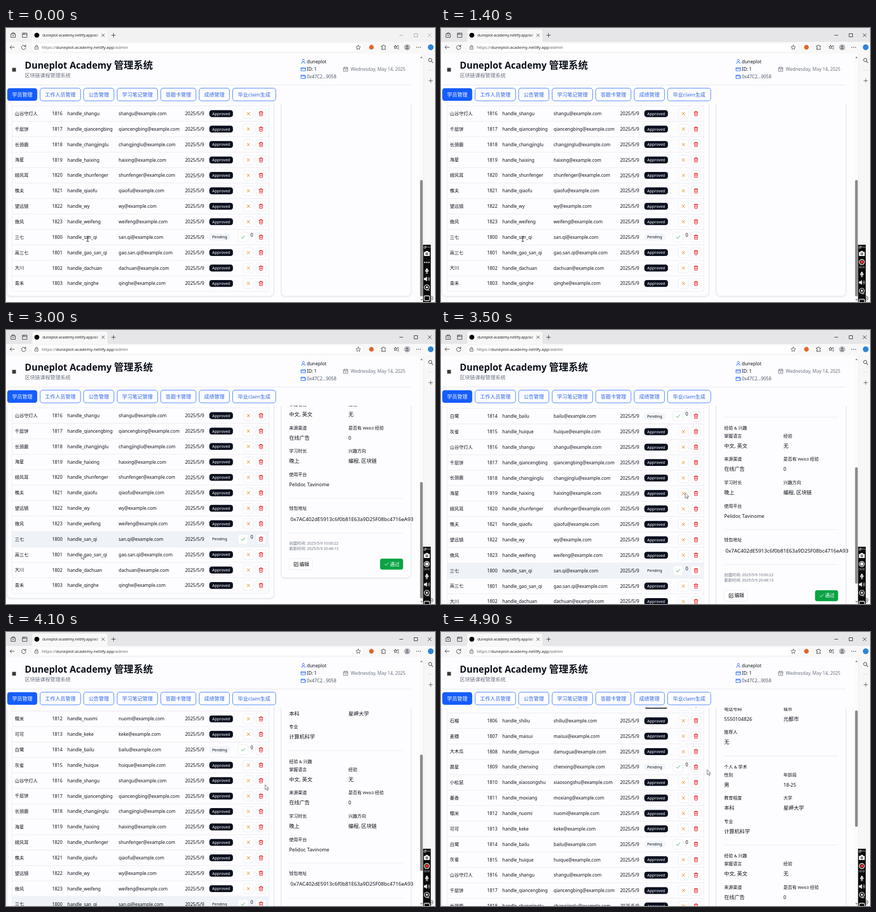
Write an HTML page that moves like this. It is 800x512 px and loops after 5100 ms.

```html
<!DOCTYPE html>
<html lang="zh-CN">
<head>
<meta charset="utf-8">
<title>管理系统</title>
<style>
html, body { margin: 0; width: 100%; height: 100%; overflow: hidden; background: #fdfdff; }
@property --scroll { syntax: "<length>"; inherits: true; initial-value: 0px; }
svg {
  display: block; width: 800px; height: 512px;
  font-family: "Noto Sans", "Noto Sans CJK SC", sans-serif;
  animation: scroll 5100ms step-end infinite;
}
text { fill: #0c1019; }
.icon { fill: none; stroke-width: .9; stroke-linecap: round; stroke-linejoin: round; }
.muted { fill: #6b7280; }
.mid { text-anchor: middle; }
#page { transform: translateY(var(--scroll)); }
#thumb { transform: translateY(calc(var(--scroll) * -.467)); }
#strip, #caption, #empty, #filled, #select, #ibeam, #arrow, #dots, #rec, #clock, #lower, #dot {
  animation: 5100ms step-end infinite;
}
#strip { animation-name: strip; }
#caption { animation-name: focus; }
#empty, #ibeam { animation-name: leave; }
#filled, #select { animation-name: enter; }
#arrow { animation-name: move; }
#dots { animation-name: idle; }
#rec { animation-name: record; }
#clock { animation-name: tick; }
#lower { animation-name: shift; }
#dot { animation-name: blink; }

@keyframes scroll {
  0% { --scroll: 0px; }
  68.62% { --scroll: 58.85px; }
  72.54% { --scroll: 117.7px; }
  84.31% { --scroll: 176.6px; }
  92.15% { --scroll: 235.4px; }
  96.07%, 100% { --scroll: 294.3px; }
}
@keyframes strip { 0% { fill: #f2f2f3; } 7.84%, 100% { fill: #e6e6e8; } }
@keyframes focus { 0% { stroke: #a2a2a2; } 7.84%, 100% { stroke: #222; } }
@keyframes leave { 0% { visibility: visible; } 39.21%, 100% { visibility: hidden; } }
@keyframes enter { 0% { visibility: hidden; } 39.21%, 100% { visibility: visible; } }
@keyframes move {
  0% { visibility: hidden; transform: translate(150px, 392px); }
  39.21% { visibility: visible; transform: translate(148px, 393px); }
  43.13% { transform: translate(136px, 400px); }
  45.09% { transform: translate(130px, 404px); }
  50.98% { transform: translate(132px, 407px); }
  54.9% { transform: translate(137px, 414px); }
  58.82% { transform: translate(140px, 418px); }
  62.74% { transform: translate(190px, 404px); }
  64.7% { transform: translate(330px, 350px); }
  68.62% { transform: translate(455px, 304px); }
  72.54% { transform: translate(479px, 294px); }
  76.47% { transform: translate(481px, 290px); }
  80.39% { transform: translate(483px, 285px); }
  84.31% { transform: translate(484px, 281px); }
  88.23% { transform: translate(488px, 273px); }
  92.15% { transform: translate(492px, 265px); }
  96.07%, 100% { visibility: visible; transform: translate(496px, 257px); }
}
@keyframes idle { 0% { visibility: visible; } 9.8%, 100% { visibility: hidden; } }
@keyframes record { 0% { visibility: hidden; } 9.8%, 100% { visibility: visible; } }
@keyframes tick { 0% { visibility: hidden; } 17.64%, 100% { visibility: visible; } }
@keyframes shift { 0% { transform: none; } 17.64%, 100% { transform: translateY(6.5px); } }
@keyframes blink {
  0%, 15.68%, 33.33%, 50.98%, 68.62%, 86.27% { fill: #fff; }
  9.8%, 24.5%, 42.15%, 59.8%, 77.45%, 95.09%, 100% { fill: #ef2b2d; }
}
</style>
</head>
<body>
<svg id="stage" viewBox="0 0 800 512"></svg>
<script>
// Latin runs are set a little smaller than the CJK runs beside them.
const mix = (str, size) =>
  str.replace(/[\x20-\x7e]+/g, run => `<tspan font-size="${(size * .945).toFixed(2)}">${run}</tspan>`);
// Text placed by its visual middle line.
const text = (x, y, size, str, attr = '') =>
  `<text x="${x}" y="${(y + size * .345).toFixed(2)}" font-size="${size}" ${attr}>${mix(str, size)}</text>`;
const rect = (x, y, w, h, r, fill, stroke = 'none', attr = '') =>
  `<rect x="${x}" y="${y}" width="${w}" height="${h}" rx="${r}" fill="${fill}" stroke="${stroke}" ${attr}/>`;
const circle = (x, y, r, fill, attr = '') => `<circle cx="${x}" cy="${y}" r="${r}" fill="${fill}" ${attr}/>`;
const icon = (x, y, d, color, attr = '') =>
  `<path class="icon" transform="translate(${x} ${y})" d="${d}" stroke="${color}" ${attr}/>`;
const line = (x1, x2, y, color) => `<path d="M${x1} ${y}H${x2}" stroke="${color}" stroke-width=".8"/>`;
const group = (id, body) => `<g id="${id}">${body}</g>`;

const CROSS = 'M-2.6-2.6 2.6 2.6M2.6-2.6-2.6 2.6';
const CHECK = 'M-3.2.2-1 2.4 3.4-2.4';
const TRASH = 'M-3.6-2.8h7.2M-1.3-2.8v-1.4h2.6v1.4M-2.8-2.8v6q0 1 1 1h3.6q1 0 1-1v-6M-.9-.4v2.2M.9-.4v2.2';
const PLUS = 'M-3.5 0h7M0-3.5v7';
const BLUE = '#155dfc', EDGE = '#e6e8ef', INK = '#333';

const people = [
  [1805, '竹子', 'zhuzi'], [1806, '石榴', 'shiliu'], [1807, '麦穗', 'maisui'],
  [1808, '大木瓜', 'damugua'], [1809, '晨星', 'chenxing'], [1810, '小松鼠', 'xiaosongshu'],
  [1811, '墨香', 'moxiang'], [1812, '糯米', 'nuomi'], [1813, '可可', 'keke'],
  [1814, '白鹭', 'bailu'], [1815, '灰雀', 'huique'], [1816, '山谷守灯人', 'shangu'],
  [1817, '千层饼', 'qiancengbing'], [1818, '长颈鹿', 'changjinglu'], [1819, '海星', 'haixing'],
  [1820, '顺风耳', 'shunfenger'], [1821, '樵夫', 'qiaofu'], [1822, '望远镜', 'wy'],
  [1823, '微风', 'weifeng'], [1800, '三七', 'san_qi'], [1801, '高三七', 'gao_san_qi'],
  [1802, '大川', 'dachuan'], [1803, '青禾', 'qinghe']
];
const waiting = [1809, 1814, 1800];
const PITCH = 28.85, FIRST = 160 - 11 * PITCH;

const button = (x, d, color) => rect(x - 9.3, -9.2, 18.6, 18.4, 4, '#fff', EDGE, 'stroke-width=".8"') + icon(x, 0, d, color);

function row([id, name, nick], i) {
  const pending = waiting.includes(id);
  const state = pending
    ? rect(379, -6.5, 39, 13, 5, '#f1f4f8') + text(398.5, 0, 7.6, 'Pending', 'class="mid"')
      + button(442, CHECK, '#16a34a') + text(456, -4, 8.9, '0')
    : rect(379.2, -6.4, 44, 12.8, 4.5, '#0b1020') + text(401.2, 0, 7.8, 'Approved', 'class="mid" style="fill:#fff"')
      + button(452, CROSS, '#e17100');
  return `<g transform="translate(0 ${(FIRST + i * PITCH).toFixed(2)})">`
    + (id === 1800 ? group('select', rect(12, -14.4, 478, PITCH, 0, '#eff3f8')) : '')
    + text(16.5, 0, 8.5, name) + text(86, 0, 8.9, String(id))
    + text(114.5, 0, 8.85, 'handle_' + nick)
    + text(210, 0, 8.85, nick.replace(/_/g, '.') + '@example.com')
    + text(334, 0, 9, '2025/5/9') + state + button(475.5, TRASH, '#e7000b')
    + (id === 1803 ? '' : line(12, 490, 14.4, EDGE)) + '</g>';
}

// One labelled pair of fields: left column, then right column.
const pair = (y, l1, v1, l2 = '', v2 = '') =>
  text(528, y, 8.25, l1) + text(528, y + 18.5, 9.65, v1) + text(638.5, y, 8.25, l2) + text(638.5, y + 18.5, 9.65, v2);

const card = (x, w, bottom) => rect(x, -420, w, bottom + 420, 7, '#fdfdff', EDGE, 'filter="url(#soft)"');

const details = card(513.5, 241.5, 463)
  + pair(-150.3, '电话号码', '5550104826', '城市', '元都市') + pair(-106.8, '推荐人', '无')
  + line(528, 740, -62.8, EDGE) + text(528, -42.5, 8.25, '个人 &amp; 学术')
  + pair(-27.5, '性别', '男', '年龄段', '18-25') + pair(16, '教育程度', '本科', '大学', '星岬大学')
  + pair(59.7, '专业', '计算机科学')
  + line(528, 740, 104, EDGE) + text(528, 124.2, 8.25, '经验 &amp; 兴趣')
  + pair(139, '掌握语言', '中文, 英文', '经验', '无')
  + pair(182.7, '来源渠道', '在线广告', '是否有 Web3 经验', '0')
  + pair(226.3, '学习时长', '晚上', '兴趣方向', '编程, 区块链')
  + pair(270, '使用平台', 'Pelidor, Tavinome')
  + line(528, 740, 314.3, EDGE) + text(528, 333, 8.25, '钱包地址')
  + text(530.5, 353.3, 10.15, '0x7AC402dE5913c6f0b81E63a9D25F08bc4716eA93')
  + line(528, 740, 379.5, EDGE)
  + text(528, 398.7, 7.4, '创建时间: 2025/5/9 10:00:22', 'class="muted"')
  + text(528, 408.2, 7.4, '更新时间: 2025/5/9 20:48:13', 'class="muted"')
  + rect(528, 427.3, 43.5, 20.5, 4, '#fff', EDGE, 'stroke-width=".8"')
  + icon(541, 437.5, 'M0-3.4h-3.6v7.2h7.2V.2M-1.4 1.4l.3-1.8 3.8-3.8 1.5 1.5-3.8 3.8z', '#111')
  + text(547.3, 437.5, 9, '编辑', 'font-weight="500"')
  + rect(697.5, 427.3, 43, 20.5, 4, '#0aa344') + icon(709.5, 437.5, CHECK, '#fff')
  + text(716, 437.5, 9, '通过', 'font-weight="500" style="fill:#fff"');

const page = card(2, 497.5, 501)
  + rect(11.5, -420, 478.5, 912, 4, 'none', EDGE, 'stroke-width=".8"')
  + people.map(row).join('')
  + group('empty', card(513.5, 241.5, 501)) + group('filled', details);

const tabs = [[2, 56.5, '学员管理'], [63.3, 76, '工作人员管理'], [144.5, 57, '公告管理'], [207, 76, '学习笔记管理'],
  [288.3, 66.2, '答题卡管理'], [360, 57, '成绩管理'], [422.3, 81, '毕业claim生成']];

const header = rect(0, 48, 771, 93.5, 0, '#fdfdff') + rect(11.5, 74.5, 7, 7, 0, '#3a3a38')
  + text(35, 70, 18.1, 'Duneplot Academy 管理系统', 'font-weight="700"')
  + text(35, 89.1, 9.5, '区块链课程管理系统', 'class="muted"')
  + icon(554.5, 62.5, 'M-3 4V2.8Q-3 1 0 1t3 1.8V4M0-4a2 2 0 1 0 .01 0', BLUE)
  + icon(554.5, 77, 'M-4-2.8h8v5.8h-8zM-4-.8h8', BLUE)
  + icon(554.5, 91, 'M-4-3h6.8v1.6H4V3.4h-8zM-4-1.4H3M2 1h2', BLUE)
  + text(561, 62.5, 9.1, 'duneplot', 'font-weight="500"') + text(561, 77, 9, 'ID: 1', 'font-weight="500"')
  + text(561, 90.7, 8.9, '0x47C2...9058', 'style="fill:#4b5563"')
  + icon(633.5, 77, 'M-3.8-3h7.6v7h-7.6zM-3.8-.8h7.6M-1.8-4.4v2.2M1.8-4.4v2.2M-1 1.6h2', '#6b7280')
  + text(643, 76.8, 8.9, 'Wednesday, May 14, 2025', 'class="muted"')
  + line(3, 755, 106.5, '#e3e5ea')
  + tabs.map(([x, w, label], i) => rect(x + .3, 112.4, w - .6, 23.7, 4.5, i ? '#fdfdff' : BLUE, i ? BLUE : 'none', 'stroke-width=".8"')
    + text(x + w / 2, 124.4, 9.5, label, `class="mid" font-weight="500" style="fill:${i ? '#2b64e6' : '#fff'}"`)).join('');

const chrome = rect(0, 0, 800, 27, 0, '#e6e6e8', 'none', 'id="strip"') + rect(0, 26, 800, 22, 0, '#f8f8f8')
  + '<path d="M46 26q3 0 3-3V7q0-4 4-4H185q4 0 4 4V23q0 3 3 3z" fill="#f8f8f8"/>'
  + icon(13.5, 13.5, 'M-4-2.5h8v6.5h-8zM-2-2.5v-2h4v2M-1.5.8h3', INK)
  + icon(35, 13.5, 'M-4-4h8v8h-8zM-4-1.5h8M-1.5-4v2.5', INK)
  + circle(57.5, 13.5, 4.6, '#000')
  + text(68, 13.5, 7.1, 'duneplot-academy.netlify.app/ad', 'style="fill:url(#fade)"')
  + icon(181, 13.5, CROSS, INK) + icon(200.5, 13.5, PLUS, INK)
  + `<g id="caption" class="icon">
      <path d="M734 13.5h6M761.5 10.5h6v6h-6zM787 10.5l6 6M793 10.5l-6 6"/></g>`
  + icon(11.5, 36, 'M4 0H-4M-1-3.2-4 0l3 3.2', INK)
  + icon(33, 36, 'M3.4-1.8A4 4 0 1 0 4 .6M3.8-4.2v2.6H1.2', INK)
  + rect(47, 27.8, 620, 17, 8.5, '#fff', '#ececec', 'stroke-width=".7"')
  + icon(57, 36, 'M-2.8-1h5.6v4.6h-5.6zM-1.6-1v-1.4a1.6 1.6 0 0 1 3.2 0V-1M0 1v.5', '#555')
  + '<text x="66.5" y="38.6" font-size="7.76" style="fill:#666">https://<tspan fill="#222">duneplot-academy.netlify.app</tspan>/admin</text>'
  + icon(657, 36, 'M0-4.2 1.3-1.4 4.3-1 2.1 1 2.7 4 0 2.5-2.7 4-2.1 1-4.3-1-1.3-1.4z', '#555')
  + circle(681.5, 36, 4.4, '#e2652c')
  + icon(704, 36, 'M-3.5-2.5h2a1.6 1.6 0 0 1 3.2 0h1.8v2.2a1.5 1.5 0 0 0 0 2.8V4h-7V2.6a1.5 1.5 0 0 0 0-3z', INK)
  + icon(728, 36, 'M-1.6-3.8-.7-1.7 1.5-1.4-.2.1.2 2.4-1.6 1.3-3.4 2.4-3 .1-4.5-1.4-2.5-1.7zM1.5-2.8h3M3 .2h1.6M2 3h2.6', INK)
  + circle(748, 36, 5.8, '#b9bbc0') + circle(748, 34.4, 1.9, '#6f7278') + '<path d="M744.6 39.6a3.5 3 0 0 1 6.8 0z" fill="#6f7278"/>'
  + [766, 769.5, 773].map(x => circle(x, 36, .85, INK)).join('')
  + circle(792, 36, 5.4, '#2f83d8');

const side = rect(771, 48, 8, 464, 0, '#fbfbfb') + rect(779, 47, 21, 465, 0, '#f7f7f8')
  + '<path d="M779 48v464" stroke="#e7e7e9" stroke-width=".8"/>'
  + '<path d="M772.5 56.3h4.6l-2.3-3.2zM772.5 506.6h4.6l-2.3 3.2z" fill="#8a8a8a"/>'
  + rect(772.2, 284, 5, 217.5, 2.5, '#8a8a8a', 'none', 'id="thumb"')
  + icon(792, 61, 'M-1-4.2a3 3 0 1 0 .01 0M1.2 1 4 3.8', '#555', 'style="stroke-width:1.2"')
  + line(787, 797, 79, '#dcdcde') + icon(792, 98.5, PLUS, '#555')
  + circle(792.5, 505, 3.8, 'none', 'stroke="#555"') + circle(792.5, 505, 1.2, 'none', 'stroke="#555"');

const lower = icon(784.8, 453.5, 'M0-4a1.3 1.3 0 0 1 1.3 1.3v2.4a1.3 1.3 0 0 1-2.6 0v-2.4A1.3 1.3 0 0 1 0-4M-3-.8a3 3 0 0 0 6 0M0 2.4v2.2M-1.8 4.6h3.6', '#fff', 'style="fill:#fff"')
  + '<path d="M779.5 467h2.4l3-2.6v9.2l-3-2.6h-2.4z" fill="#fff"/>'
  + icon(787, 469, 'M0-2a3 3 0 0 1 0 4M1.6-3.6a5 5 0 0 1 0 7.2', '#fff')
  + circle(784.8, 484.5, 4.6, 'none', 'stroke="#fff" stroke-width="1.3"') + circle(784.8, 484.5, 2, '#fff')
  + icon(786.5, 488.5, 'M-2 1.5h5', '#fff')
  + rect(779.8, 500.5, 10, 9, 1.5, 'none', '#fff', 'stroke-width="1.3"');

const recorder = rect(777.7, 405, 14.4, 107, 0, '#0a0a0a')
  + icon(781.5, 409.7, 'M-1.5-.8h2.6v2.6h-2.6zM-.3-2h2.6v2.6', '#fff', 'style="stroke-width:.7"')
  + [786.2, 788.3, 790.4].map(x => circle(x, 409.5, .65, '#fff')).join('')
  + '<path d="M779.4 418.6h2.6l1-1.8h3.6l1 1.8h2.6v7.4h-10.8z" fill="#fff"/>'
  + circle(784.8, 422, 2.3, '#0a0a0a') + circle(784.8, 422, 1.2, '#fff')
  + group('dots', [781, 784.8, 788.6].map(x => circle(x, 438, 1.2, '#fff')).join(''))
  + group('rec', circle(784.8, 437.3, 4.8, 'none', 'stroke="#fff" stroke-width="1.3"') + circle(784.8, 437.3, 3, '#fff', 'id="dot"'))
  + group('clock', text(784.8, 447.6, 4.6, '00:00', 'class="mid" style="fill:#ddd"'))
  + group('lower', lower);

const cursors = group('ibeam', icon(152.3, 394, 'M-2.2-5Q0-5 0-4Q0-5 2.2-5M0-4V4M-2.2 5Q0 5 0 4Q0 5 2.2 5', '#111'))
  + group('arrow', '<path d="M.3.3v9.6l2.2-2 1.5 3.4 1.6-.7-1.5-3.3h3z" fill="#fff" stroke="#555" stroke-width=".8" stroke-linejoin="round"/>');

document.getElementById('stage').innerHTML = `<defs>
  <filter id="soft" x="-5%" y="-5%" width="110%" height="110%">
    <feDropShadow dx="0" dy="1" stdDeviation="1" flood-color="#1c2440" flood-opacity=".13"/></filter>
  <linearGradient id="fade" gradientUnits="userSpaceOnUse" x1="166" x2="177">
    <stop stop-color="#222"/><stop offset="1" stop-color="#222" stop-opacity="0"/></linearGradient></defs>`
  + group('page', page) + header + chrome + side + recorder + cursors;
</script>
</body>
</html>
```
